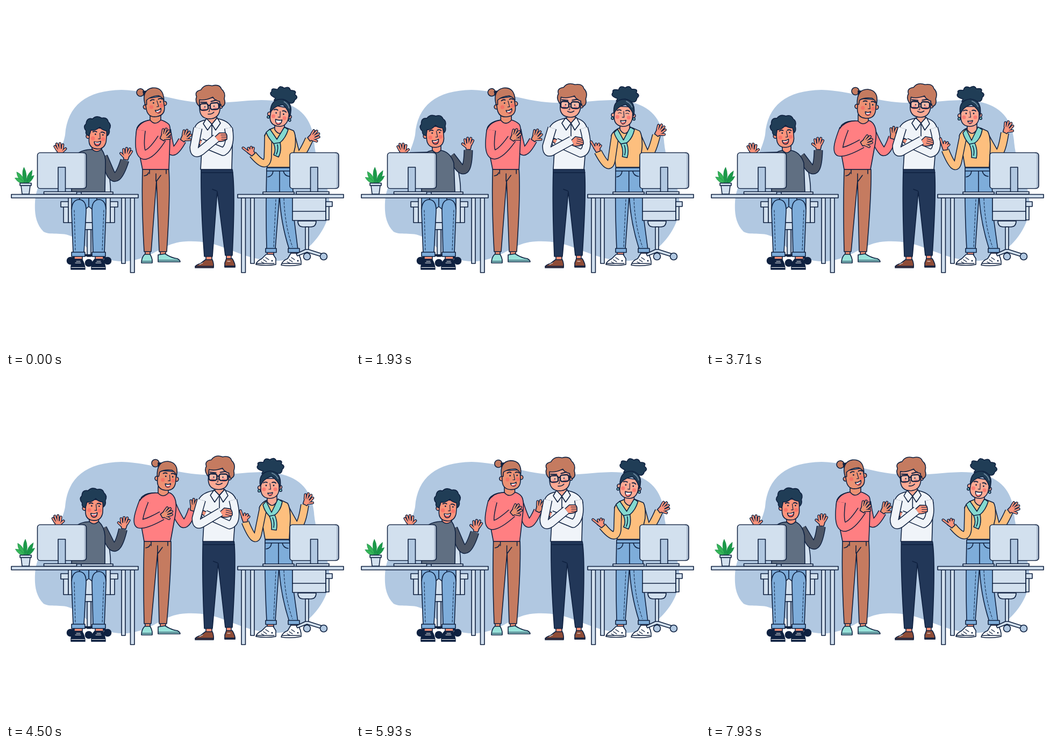
These frames come from a looping animation (640 by 640 pixels, 8 s). An HTML page:

```html
<!DOCTYPE html>
<html lang="en">
<head>
<meta charset="utf-8">
<title>Office talk</title>
<style>
html, body { margin: 0; width: 100%; height: 100%; overflow: hidden; background: #fff; }
svg { display: block; width: 100vw; height: 100vh; }
</style>
</head>
<body>
<svg id="stage" viewBox="0 0 640 640" stroke="#0f2140" stroke-width="1.6" stroke-linejoin="round" stroke-linecap="round"></svg>
<script>
const INK = '#0f2140', STEEL = '#d2e0ee', SHADE = '#b1c8e1', SKIN = '#fc947b', FAIR = '#fca993', TAN = '#ec9173',
      PINK = '#ff7f82', DENIM = '#7eadda', BROWN = '#c57b60', DARK = '#203d56', YELLOW = '#fdbf7e',
      TEAL = '#84d9d0', SHIRT = '#f0f4f9', ROSE = '#f9605f', LEATHER = '#8f4c37';
const LOOP = 8000, CYCLE = 7130, HALF = CYCLE / 2;

// Anything with data-b blends from its own value to data-b as its actor changes pose.
// Both values must use the same sequence of path commands.
const shape = (fill, a, b, extra = '') =>
  `<path d="${a}" ${b ? `data-b="${b}"` : ''} fill="${fill}" ${extra}/>`;
const line = (a, b, extra) => shape('none', a, b, extra);
const box = (x, y, w, h, fill = STEEL, r = 0) =>
  `<rect x="${x}" y="${y}" width="${w}" height="${h}" rx="${r}" fill="${fill}"/>`;
const dot = (x, y, r, fill, extra = '') => `<circle cx="${x}" cy="${y}" r="${r}" fill="${fill}" ${extra}/>`;
const placed = (a, b, body) => `<g transform="${a}" data-b="${b}">${body}</g>`;
const actor = (id, body) => `<g data-actor="${id}">${body}</g>`;

const sleeve = (color, width, a, b) =>
  line(a, b, `stroke-width="${width + 3}" stroke-linecap="butt"`) +
  line(a, b, `stroke="${color}" stroke-width="${width}" stroke-linecap="butt"`);

function hand(skin, a, b, flip = 1, pointing = false) {
  const at = ([x, y, r]) => `translate(${x} ${y}) rotate(${r}) scale(${flip} 1)`;
  const fingers = pointing
    ? 'M-4 -9L-6 -20M0 -10L1 -13M3 -8L6 -11M4 -4L8 -7'
    : 'M-5 -8L-8 -15M-2 -10L-4 -19M1 -10L2 -19M5 -8L7 -16M4 -3L11 -8';
  const palm = 'M-4 2L-6 -8Q0 -13 6 -8L4 2Z';
  return placed(at(a), at(b),
    line(fingers, '', 'stroke-width="5.2"') + shape(skin, palm) +
    line(fingers, '', `stroke="${skin}" stroke-width="2.6"`));
}

function eyes(x1, x2, y) {
  return `<g class="open">${dot(x1, y, 1.4, INK, 'stroke="none"')}${dot(x2, y, 1.4, INK, 'stroke="none"')}</g>` +
    `<g class="shut">${line(`M${x1 - 3} ${y}q3 -2 6 0M${x2 - 3} ${y}q3 -2 6 0`, '', 'stroke-width="1.1"')}</g>`;
}
const cheeks = (x1, x2, y) => [x1, x2].map(x => dot(x, y, 3.6, ROSE, 'stroke="none" opacity=".6"')).join('');
const brows = (x1, x2, y) => line(`M${x1 - 4} ${y}q4 -2.5 7 -.5M${x2 - 3} ${y - .5}q4 -2 7 1`, '', 'stroke-width="1.9"');
const nose = x => line(`M${x} -7L${x + 1.5} 4H${x - 2}`, '', 'stroke-width="1.2"');

const blob = shape(SHADE, 'M215 156C260 157 300 172 345 178C395 184 430 176 475 175C536 175 568 200 573 250C576 300 603 325 602 375C600 420 552 474 505 474C460 473 440 462 415 453C385 441 365 437 335 438C290 440 280 468 225 475C170 478 150 445 128 432C108 418 85 428 70 420C55 405 53 385 54 365C56 330 75 310 85 295C100 275 107 255 110 240C114 185 150 157 215 156Z', '', 'stroke="none"');

const leftChair =
  shape(STEEL, 'M150 357V285Q182 275 191 310Q196 335 194 357Z') + box(107, 370, 9, 33) + box(194, 370, 8, 33) +
  box(102, 364, 16, 10) + box(192, 364, 16, 10) +
  box(116, 354, 78, 49) + box(146, 403, 17, 13) + box(151, 416, 7, 50) +
  line('M122 470Q136 462 154 464Q172 462 187 470', '', 'stroke-width="4"') +
  dot(120, 474, 6.5, INK) + dot(154, 478, 6.5, INK) + dot(189, 474, 6.5, INK);

const rightChair =
  box(533, 353, 62, 46) + box(595, 372, 6, 26) + box(595, 364, 12, 9) + line('M533 382H595') +
  shape(STEEL, 'M543 400H577Q577 411 567 411H553Q543 411 543 400Z') + box(557, 411, 6, 44) +
  shape(STEEL, 'M557 453L540 461L542 465L560 458L586 466L588 461L563 453Z') +
  dot(560, 466, 6.5, SHADE) + dot(591, 466, 6.5, SHADE);

const seated = actor('seated',
  shape(DENIM, 'M122 357H186V378H160L154 373L148 378H122Z') + line('M137 357v4M154 358v14M169 357v4') +
  shape(SKIN, 'M127 464H142V474H127ZM166 464H181V474H166Z') +
  [['M122 384Q121 361 136 360Q150 361 149 382L145 460H125Z', 122, 'M127 380L129 456'],
   ['M160 382Q159 361 173 360Q187 361 186 384L183 460H162Z', 160, 'M182 380L179 456']].map(([leg, x, seam]) =>
    shape(DENIM, leg) + line(seam, '', 'stroke-width="1" stroke-dasharray="4 3"') + box(x, 458, 25, 8, DENIM) +
    shape(INK, `M${x - 1} 490Q${x - 2} 478 ${x + 5} 471H${x + 19}Q${x + 25} 480 ${x + 25} 490Z`) +
    line(`M${x} 486.5H${x + 24}M${x + 7} 478h10M${x + 9} 475h7`, '', 'stroke="#fff" stroke-width="1"')).join('') +
  hand(SKIN, [101, 275, -8], [87, 276, -4]) +
  sleeve('#4d5666', 15, 'M150 283L128 284', 'M138 280L100 281') +
  sleeve('#4d5666', 14, 'M181 280L193 308Q205 337 221 287', 'M176 279L192 300Q208 318 209 268') +
  shape('#606f82', 'M122 346V288Q132 268 157 267L178 267Q186 278 185 295L184 346Z', 'M122 346V281Q130 271 140 269L160 269Q176 273 182 292L184 346Z') +
  hand(SKIN, [223, 284, 10], [209, 265, 2], -1) +
  shape(SKIN, 'M160 255V266Q168 275 178 266V255Z', 'M142 255V268Q150 278 158 268V255Z') +
  placed('translate(171 243) rotate(5)', 'translate(147 240) rotate(-4)',
    dot(-18, 1, 4, SKIN) + shape(SKIN, 'M-16 -16V8Q-15 23 0 23Q14 23 16 8V-16Z') +
    shape(DARK, 'M-17 0Q-24 -1 -23 -9Q-30 -16 -24 -22Q-24 -34 -13 -32Q-6 -40 4 -35Q14 -38 17 -29Q24 -24 20 -15Q22 -7 17 -3Q16 -6 15 -12Q6 -13 2 -18Q-7 -9 -14 -11Q-15 -4 -17 0Z') +
    brows(-6, 8, -8) + eyes(-5, 9, -4) + cheeks(-9, 10, 4) + nose(3) +
    shape(ROSE, 'M-6 10Q1 12 6 8Q6 17 0 17Q-5 17 -6 10Z') + line('M-4 11.5Q1 13 4 10.5', '', 'stroke="#fff"')));

const redShirt = actor('red',
  shape(TAN, 'M259 455H268V465H259ZM287 455H297V465H287Z') +
  shape('#98e2d9', 'M252 478Q252 468 258 462H268Q273 470 272 478Z') +
  shape('#98e2d9', 'M283 476V463L296 461Q308 469 319 470Q324 473 324 476Z') + line('M253 475H271M284 473H322', '', 'stroke-width="1"') +
  shape(BROWN, 'M254 304H303Q306 350 299 457H285L280 325L270 457H257Q252 370 254 304Z', 'M257 304H307Q308 350 299 457H285L282 325L270 457H257Q255 370 257 304Z') +
  line('M267 304v8M298 304v8M279 312v14M280 326l8 -11M257 316q7 -1 8 -6', 'M270 304v8M301 304v8M282 312v14M283 326l8 -11M260 316q7 -1 8 -6') +
  sleeve(PINK, 13, 'M299 230Q302 250 306 266Q311 280 328 250', 'M307 230Q320 262 329 271Q337 274 347 244') +
  shape(PINK, 'M270 212Q250 214 244 226Q240 240 246 264L254 304H303L305 250Q307 225 303 220Q296 214 288 212Z', 'M284 214Q262 212 252 222Q245 235 250 265L257 304H306L315 255Q319 230 312 220Q308 214 302 213Z') +
  hand(TAN, [329, 249, 35], [347, 245, 18]) +
  sleeve(PINK, 15, 'M251 231Q245 278 259 277Q272 274 290 246', 'M257 228Q242 266 248 271Q258 274 290 256') +
  shape(PINK, 'M270 212Q250 214 243 230L259 231L272 220Z', 'M284 214Q260 212 249 228L265 230L286 222Z', 'stroke="none"') +
  line('M270 212Q250 214 243 230', 'M284 214Q260 212 249 228') +
  hand(TAN, [291, 247, 33], [291, 256, 60]) +
  shape(TAN, 'M268 200V212Q277 224 288 212V200Z', 'M283 202V214Q292 224 302 214V202Z') +
  placed('translate(277 184) rotate(-9)', 'translate(299 187) rotate(4)',
    dot(-23, -27, 7, BROWN) + shape(INK, 'M-18 -28L-11 -28L-17 -19Z') +
    dot(-18, 1, 4, TAN) + dot(18, 0, 4, TAN) +
    shape(TAN, 'M-17 -14V6Q-16 22 0 22Q16 22 17 6V-14Z') +
    shape(BROWN, 'M-18 -3Q-21 -31 0 -32Q21 -31 18 -6Q15 -13 9 -16Q-6 -17 -14 -11L-15 -3Z') +
    brows(-3, 11, -9) + eyes(-2, 11, -4) + cheeks(-7, 12, 3) + nose(5) +
    shape('#fff', 'M-1 10Q5 12 10 8Q10 16 4 16Q0 15 -1 10Z', 'M-2 10Q4 12 8 9Q8 16 3 16Q-1 16 -2 10Z') +
    line('M1 14.5Q5 15.5 8 12.5', '', `stroke="${ROSE}" stroke-width="2"`)));

const boss = actor('boss',
  shape(SKIN, 'M372 462H383V474H372ZM410 462H419V472H410Z') +
  shape(LEATHER, 'M352 487Q351 482 362 479L371 472H384Q387 480 386 487Z') +
  shape(LEATHER, 'M407 486V478L410 470H421Q427 480 426 486Z') + line('M352 484.5H386M407 484H426', '', 'stroke-width="1.8"') +
  line('M360 481l6 -3M412 475h5', '', 'stroke="#fff" stroke-width="1"') +
  shape('#223758', 'M363 304H421Q427 340 421 464H408L393 345L384 466H369Q362 370 363 304Z', 'M367 304H425Q429 340 421 464H408L395 345L384 466H369Q365 370 367 304Z') +
  line('M364 310H422M384 341l8 3', 'M367 310H426M386 341l8 3') +
  shape(SHIRT, 'M371 212Q351 216 350 232L364 270L362 304H420L421 265L422 232Q418 215 396 210Z', 'M389 209Q362 214 358 232L369 270L367 304H424L427 268L430 232Q430 215 411 209Z') +
  line('M383 222V242', 'M400 221V242') +
  shape(FAIR, 'M374 202V211L383 220L392 209V202Z', 'M392 200V210L400 218L408 209V200Z') +
  shape(SHIRT, 'M373 209L367 219L375 231L383 220ZM383 220L393 208L399 218L390 231Z', 'M390 208L383 218L391 231L400 218ZM400 218L410 207L416 219L407 231Z') +
  shape(SKIN, 'M367 251L358 248L355 254L364 260Z', 'M375 249L368 246L365 252L373 258Z') +
  sleeve(SHIRT, 13, 'M414 227Q420 262 404 271L363 254', 'M424 227Q436 270 418 274L372 253') +
  shape(SKIN, 'M387 245L397 236L408 236Q412 238 411 248Q404 253 392 252Z', 'M398 252L408 243L419 245Q424 249 423 257Q416 262 404 260Z') +
  line('M400 240l10 0M401 244l10 0M401 248l9 0', 'M411 247l10 3M411 251l11 3M410 255l10 3', 'stroke-width="1.1"') +
  sleeve(SHIRT, 14, 'M357 227L350 263Q350 278 362 270L391 246', 'M365 227L355 260Q354 278 368 268L401 250') +
  placed('translate(378 187) rotate(-4)', 'translate(398 184) rotate(2)',
    dot(21, 1, 4, FAIR) + shape(FAIR, 'M-18 -16V6Q-17 23 2 23Q18 22 20 4V-16Z') +
    shape(BROWN, 'M-18 -1Q-27 -11 -22 -20Q-26 -30 -13 -32Q-6 -43 8 -38Q22 -41 25 -31Q33 -24 29 -12Q32 -1 24 2Q20 0 20 -8Q11 -10 8 -17Q-7 -11 -17 -14Z') +
    line('M-15 -9L-4 -8M4 -9L14 -11', '', 'stroke-width="2"') + cheeks(-10, 11, 5) + eyes(-8, 9, 0) +
    `<g fill="#ffffff30" stroke-width="2.4"><rect x="-17" y="-6" width="15" height="12" rx="4"/><rect x="2" y="-6" width="16" height="12" rx="4"/></g>` +
    line('M-2 -2h4M18 -2h4', '', 'stroke-width="2.2"') + line('M0 3v6h-2', '', 'stroke-width="1.1"') +
    line('M-3 14Q4 15 8 11', 'M-4 12Q2 16 8 11')));

const sneaker = (d, x) => shape('#fff', d) +
  line(`M${x} 476l6 3M${x + 4} 472l6 4M${x + 8} 468l6 4M${x - 9} 479H${x + 24}`, '', 'stroke-width="1.3"') +
  dot(x + 20, 474, 1.5, INK, 'stroke="none"');

const woman = actor('woman',
  shape(SKIN, 'M486 455H498V465H486ZM530 455H542V465H530Z') +
  sneaker('M465 481Q466 475 476 470L484 462H497L502 470V481Q484 484 465 481Z', 475) +
  sneaker('M512 482Q514 474 524 470L530 460H543Q550 470 549 481Q530 485 512 482Z', 523) +
  shape(DENIM, 'M485 301H529Q536 340 534 380L543 453H527Q510 400 509 350L501 452H485Q483 380 485 301Z', 'M482 301H527Q535 340 533 380L543 453H527Q510 400 508 350L501 452H485Q481 380 482 301Z') +
  line('M485 307H530M487 318q9 -1 10 -11M516 307q2 9 11 10M509 308V350', 'M482 307H528M484 318q9 -1 10 -11M514 307q2 9 11 10M507 308V350') +
  line('M502 360L498 448M517 358Q519 410 533 448', '', 'stroke-width="1" stroke-dasharray="4 3"') +
  box(483, 451, 20, 7.5, DENIM) + box(525, 451, 21, 7.5, DENIM) +
  sleeve(YELLOW, 13, 'M530 240L540 278Q546 288 564 248', 'M518 240L536 272Q548 288 556 236') +
  hand(SKIN, [565, 247, 55], [557, 234, 28]) +
  shape(YELLOW, 'M500 226Q486 230 482 240L486 300H529L538 262Q540 240 535 232L520 226Z', 'M488 226Q474 232 472 242L482 300H527L528 245Q527 234 513 228Z'.replace('L528 245Q527 234 513 228', 'L529 262Q529 242 524 233L511 227')) +
  sleeve(YELLOW, 12, 'M488 240L487 282Q484 306 459 276', 'M479 240L469 289Q464 314 445 268') +
  shape(YELLOW, 'M500 226Q484 231 481 242L495 246Z', 'M488 226Q474 232 471 242L486 246Z', 'stroke="none"') +
  line('M500 226Q484 231 481 242', 'M488 226Q474 232 471 242') +
  hand(SKIN, [459, 275, -42], [445, 266, -8], 1, true) +
  shape(FAIR, 'M500 216V230Q509 244 518 230V216Z', 'M486 216V230Q495 244 504 230V216Z') +
  shape(TEAL, 'M491 229L504 248L518 225L525 230Q520 246 510 254Q513 270 507 281L498 277Q503 268 498 256Q488 246 484 235Z', 'M484 229L494 250L506 225L514 230Q511 247 500 255Q506 268 503 283L494 282Q495 268 490 257Q481 248 478 236Z') +
  line('M498 256L510 254M505 258Q507 268 503 276', 'M490 257L500 255M496 260Q500 268 498 278') +
  placed('translate(509 203) rotate(10)', 'translate(491 203) rotate(0)',
    shape(DARK, 'M-15 -25L-13 -30Q-28 -34 -22 -41Q-25 -48 -12 -46Q-10 -56 0 -51Q8 -57 12 -49Q25 -51 21 -43Q30 -39 23 -33Q22 -23 12 -26Q0 -28 -15 -25Z') +
    dot(-19, 1, 3.5, FAIR) + dot(19, 0, 3.5, FAIR) + dot(-20, 7, 2.2, TEAL) + dot(20, 6, 2.2, TEAL) +
    shape(FAIR, 'M-17 -16V5Q-16 20 -1 21Q15 21 17 5V-16Z') +
    shape(DARK, 'M-18 -2Q-22 -28 1 -30Q23 -28 19 1Q16 -12 3 -20Q-8 -17 -14 -9Z') +
    line('M4 -26Q12 -23 15 -16', '', 'stroke="#6f8aa2" stroke-width="1.8"') +
    brows(-8, 7, -8) + eyes(-7, 7, -3) + cheeks(-11, 10, 4) + nose(0) +
    shape('#fff', 'M-6 9Q0 11 6 8Q6 17 0 18Q-5 17 -6 9Z', 'M-4 11Q0 12 5 10Q4 15 0 16Q-3 15 -4 11Z') +
    line('M-3 15Q0 17 3 14', 'M-2 14Q0 15 3 13', `stroke="${ROSE}" stroke-width="2.2"`)));

const plant = actor('plant',
  placed('rotate(-3 36 330)', 'rotate(3 36 330)',
    ['M36 331Q28 312 35 300Q42 314 36 331', 'M35 331Q21 322 21 308Q34 314 35 331', 'M37 331Q38 314 50 306Q49 324 37 331',
     'M35 331Q23 330 17 319Q29 318 35 331', 'M37 331Q43 317 53 316Q48 329 37 331'].map((leaf, i) =>
      shape(i % 2 ? '#35b558' : '#1c9a49', leaf, '', 'stroke="#128040" stroke-width=".6"')).join(''))) +
  shape(STEEL, 'M28 334H45L43 350H30Z') + box(26, 329.5, 21, 4.5);

const desk = (x, w, front, back) =>
  box(back, 357, 7, 122) + box(front, 357, 7.5, 139) + box(x, 350.5, w, 6.5);
const monitor = (x, stand, base) =>
  box(x, 273, 91, 66.5, '#aebdd0', 5) + shape(STEEL, `M${x + 5} 273.8h78q4 0 4 4v57q0 4 -4 4h-78q-4 0 -4 -4v-57q0 -4 4 -4`, '', 'stroke="none"') +
  box(stand, 300, 13.5, 46, SHADE) + box(base, 345.5, 61, 4.5);

const stage = document.getElementById('stage');
stage.innerHTML = blob + leftChair + seated + redShirt + boss + woman + rightChair +
  desk(10, 236, 231.5, 215) + desk(431, 197, 438, 455) + plant +
  monitor(58.5, 97, 70.5) + monitor(528, 566.5, 540) + box(140, 346, 59, 4) + box(478, 346, 58, 4);

const timing = {
  seated: { start: 100, span: 1300 },
  boss: { start: 550, span: 1400 },
  woman: { start: 1050, span: 1500, blink: [.4, .75] },
  red: { start: 1650, span: 1500, blink: [.5, .93] },
  plant: { start: 0, span: HALF }
};

const actors = [...stage.querySelectorAll('[data-actor]')].map(root => ({
  ...timing[root.dataset.actor],
  open: root.querySelector('.open'),
  shut: root.querySelector('.shut'),
  parts: [...root.querySelectorAll('[data-b]')].map(el => {
    const name = el.tagName === 'path' ? 'd' : 'transform';
    return { el, name, from: el.getAttribute(name), to: el.dataset.b.match(/-?[\d.]+/g).map(Number) };
  })
}));

function draw(now) {
  const time = now % LOOP;
  for (const { start, span, blink, open, shut, parts } of actors) {
    const phase = (time - start + CYCLE) % CYCLE;
    const step = Math.min(1, phase % HALF / span);
    const eased = (1 - Math.cos(Math.PI * step)) / 2;
    const pose = phase < HALF ? eased : 1 - eased;
    for (const { el, name, from, to } of parts) {
      let i = 0;
      el.setAttribute(name, from.replace(/-?[\d.]+/g, n => (+n + (to[i++] - n) * pose).toFixed(2)));
    }
    if (open) {
      const closed = blink && step > blink[0] && step < blink[1];
      open.style.display = closed ? 'none' : '';
      shut.style.display = closed ? '' : 'none';
    }
  }
  requestAnimationFrame(draw);
}
draw(performance.now());
</script>
</body>
</html>
```
